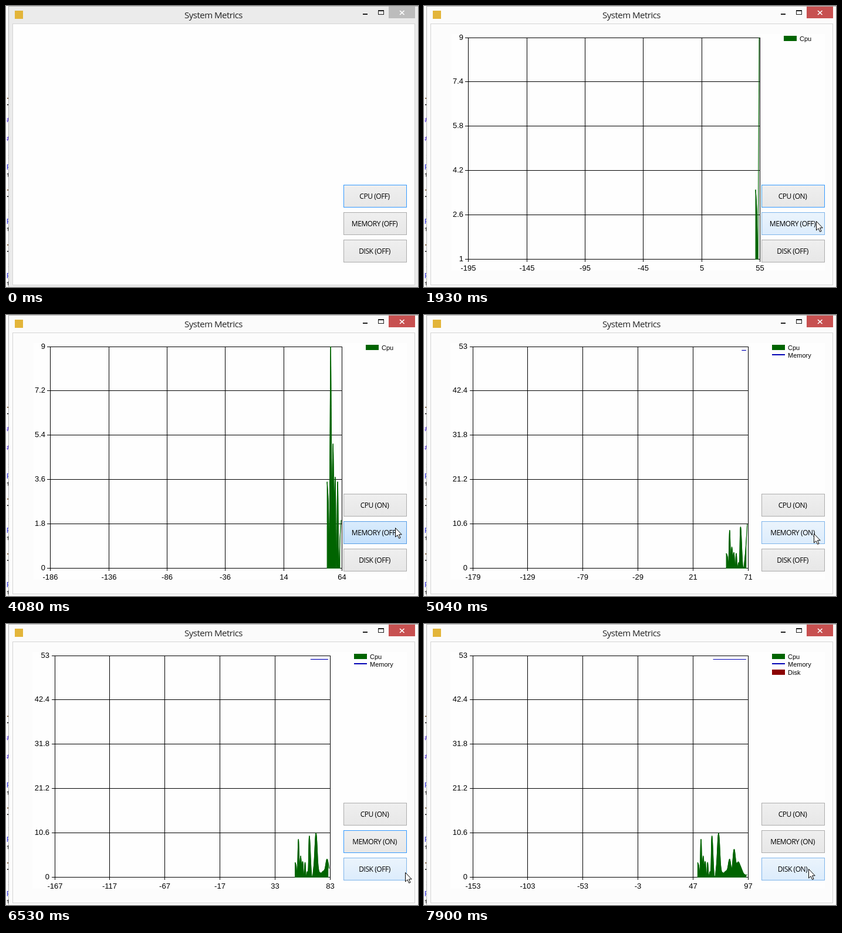
These frames come from a looping animation (702 by 481 pixels, 8000 ms). An HTML page:

```html
<!DOCTYPE html>
<html lang="en">
<head>
<meta charset="utf-8">
<title>System Metrics</title>
<style>
  html, body { margin: 0; width: 100%; height: 100%; overflow: hidden; background: #fff; }
  svg { display: block; }
  text { font-family: "Liberation Sans", Arial, sans-serif; white-space: pre; }
  .title { font: 15px "Open Sans", sans-serif; letter-spacing: -.5px; fill: #222; }
  .button { font: 12px "Open Sans", sans-serif; letter-spacing: -.45px; }
  .axis { font-size: 13px; }
  .legend { font-size: 11px; }
  .code { font: 11px "Noto Sans Mono", monospace; }
  .crisp { shape-rendering: crispEdges; }
</style>
</head>
<body>
<svg width="702" height="481" viewBox="0 0 702 481">
  <defs id="defs"></defs>
  <g id="scene"></g>
  <path id="pointer" d="M.5 .5V16L4 12.7L6.6 18.4L9 17.4L6.5 11.8H11.2Z" fill="#fff" stroke="#000"/>
</svg>
<script>
const LOOP = 8000, START = 960, PERIOD = 247, PRESS = 130;
const MEM_STEP = 13, DISK_STEP = 26;
const GREEN = '#006400', BLUE = '#0000b4', RED = '#8b0000';
const TOP = 54, BOTTOM = 433, SPAN = 250;

const BUTTONS = [
  { name: 'CPU', on: START },
  { name: 'MEMORY', on: START + MEM_STEP * PERIOD },
  { name: 'DISK', on: START + DISK_STEP * PERIOD }
].map((b, i) => ({ ...b, y: 306 + 47 * i }));
const [CPU, MEMORY, DISK] = BUTTONS;

// fill top, fill bottom, border
const LOOKS = {
  plain: ['#efefef', '#e7e7e7', '#acacac'],
  focus: ['#efefef', '#e7e7e7', '#3399ff'],
  hover: ['#ebf4fc', '#dcecfc', '#7eb4ea'],
  press: ['#daecfc', '#c4e0fc', '#569de5']
};

// Pointer stops: time, x, y
const STOPS = [
  [280, 690, 340], [550, 668, 332], [1250, 668, 332], [1930, 669, 369],
  [3290, 676, 371], [4080, 664, 365], [4740, 665, 375], [5700, 665, 375],
  [6530, 681, 426], [7200, 656, 420]
];

const LOAD = [
  3.5, 2.7, 1, 9, 2.6, 5.05, 2.6, 3.6, 0, 3.5, 0.1, 1.2, 1.95, 9.8,
  0.4, 2.6, 10.5, 2.5, 1, 1.3, 1.9, 4.3, 2, 6.6, 3.4, 3.6, 2.5, 0.7, 0.5
];
// All series share one counter, so each new one spreads the samples.
const sampleX = k => 51.5 + k + Math.max(0, k - MEM_STEP) + Math.max(0, k - DISK_STEP);

const rect = (x, y, w, h, fill, extra = '') =>
  `<rect x="${x}" y="${y}" width="${w}" height="${h}" fill="${fill}" ${extra}/>`;
const text = (x, y, s, cls, anchor = 'start', fill = '#000') =>
  `<text x="${x}" y="${y}" class="${cls}" text-anchor="${anchor}" fill="${fill}">${s}</text>`;
const path = (d, extra) => `<path d="${d}" ${extra}/>`;
const clip = (id, x, y, w, h) => `<clipPath id="${id}">${rect(x, y, w, h, '#000')}</clipPath>`;

function pointerAt(t) {
  const i = STOPS.findIndex(s => s[0] > t);
  if (i === 0) return null;
  if (i < 0) return STOPS[STOPS.length - 1].slice(1);
  const a = STOPS[i - 1], b = STOPS[i];
  const u = (t - a[0]) / (b[0] - a[0]), ease = u * u * (3 - 2 * u);
  return [1, 2].map(j => Math.round(a[j] + (b[j] - a[j]) * ease));
}

// Lines of source code peeping out beside the window.
function codeEdge() {
  let s = '';
  for (const y of [199, 231]) s += text(1, y, '#', 'code', 'start', '#2a00d0');
  for (let y = 261; y < 481; y += 93) {
    s += text(1, y, ':', 'code', 'start', '#999') +
      text(1, y + 16, 'p', 'code', 'start', '#1010d0') +
      text(1, y + 32, 't', 'code');
  }
  for (const y of [157, 314, 408]) s += rect(2, y, 2, 2, '#806040') + rect(2, y + 11, 2, 2, '#333');
  return `<g clip-path="url(#edge)">${s}</g>`;
}

function frame(active) {
  return rect(4, 0, 698, 481, active ? '#fbfbfb' : '#ebebeb') +
    path('M4.5 0V481M4 .5H702', 'stroke="#b4b4b4" class="crisp"') +
    rect(11.5, 30.5, 685, 447, active ? '#fcfcfc' : '#fefefe', 'stroke="#d4d4d4" class="crisp"') +
    rect(15, 8, 14, 14, '#e3b53a') +
    text(353.5, 21, 'System Metrics', 'title', 'middle') +
    rect(608, 13, 8, 2, '#222') +
    rect(634.5, 7.5, 9, 7, 'none', 'stroke="#222" class="crisp"') +
    rect(634, 7, 10, 2, '#222') +
    rect(652, 1, 45, 20, active ? '#c75050' : '#bcbcbc') +
    path('M671 8L678.5 15M678.5 8L671 15', 'stroke="#fff" stroke-width="1.7"');
}

function spline(points) {
  const k = 0.6 / 3, last = points.length - 1;
  let d = 'M' + points[0];
  for (let i = 0; i < last; i++) {
    const a = points[Math.max(0, i - 1)], b = points[i];
    const c = points[i + 1], e = points[Math.min(last, i + 2)];
    d += `C${b.map((v, j) => v + k * (c[j] - a[j]))} ${c.map((v, j) => v - k * (e[j] - b[j]))} ${c}`;
  }
  return d;
}

function legend(t, x) {
  let s = rect(x, 51, 22, 9, GREEN) + text(x + 27, 60, 'Cpu', 'legend');
  if (t >= MEMORY.on) s += rect(x, 67, 22, 2, BLUE) + text(x + 27, 73, 'Memory', 'legend');
  if (t >= DISK.on) s += rect(x, 78, 22, 9, RED) + text(x + 27, 87, 'Disk', 'legend');
  return s;
}

function chart(t) {
  if (t < CPU.on) return '';
  const mem = t >= MEMORY.on;
  const [left, right, labelX, boxX] = mem ? [82.5, 551.7, 74, 45] : [75.2, 572, 67, 47];
  const width = right - left, height = BOTTOM - TOP;
  const step = Math.floor((t - START) / PERIOD);
  const end = sampleX(step) + .5, start = end - SPAN;
  const values = LOAD.slice(0, step + 1);
  const low = Math.floor(Math.min(...values));
  const high = mem ? 53 : Math.ceil(Math.max(...values));
  const px = x => left + (x - start) / SPAN * width;
  const py = y => BOTTOM - (y - low) / (high - low) * height;

  let grid = '', labels = '';
  for (let i = 0; i <= 5; i++) {
    const x = Math.round(left + width * i / 5) + .5;
    const y = Math.floor(BOTTOM - height * i / 5) + .5;
    grid += `M${x} ${TOP}V${BOTTOM + 5}M${left - 5} ${y}H${right + 1}`;
    labels += text(x, 453, start + SPAN / 5 * i, 'axis', 'middle') +
      text(labelX, y + 3.5, +(low + (high - low) * i / 5).toFixed(1), 'axis', 'end');
  }

  const points = values.map((v, k) => [px(sampleX(k)), py(v)]);
  const curve = spline(points);
  // The fill stops just short of the newest sample.
  const filled = Math.max(0, px(end - 1.3) - left);
  const series = clip('plot', left, TOP, width, height + 1) +
    clip('area', left, TOP, filled, height + 1) +
    path(`${curve}V${BOTTOM + 1}H${points[0][0]}Z`,
      `fill="${GREEN}" stroke="${GREEN}" clip-path="url(#area)"`) +
    path(curve, `fill="none" stroke="${GREEN}" stroke-width="1.2" clip-path="url(#plot)"`);
  const since = sampleX(MEM_STEP) + 1;
  const memory = end - 1.5 > since
    ? path(`M${px(since)} 60.5H${px(end - 1.5)}`, `stroke="${BLUE}" stroke-width="1.2"`) : '';

  return rect(boxX, 48, 683 - boxX, 405, '#fefefe') +
    path(grid, 'stroke="#000" class="crisp"') + labels + series + memory +
    legend(t, mem ? 593 : 613);
}

function buttons(t, tip) {
  const focused = BUTTONS.filter(b => t >= b.on - PRESS).pop() || CPU;
  return BUTTONS.map(b => {
    const hover = tip && tip[0] >= 575 && tip[0] < 683 && tip[1] >= b.y && tip[1] < b.y + 39;
    const press = t >= b.on - PRESS && t < b.on;
    const look = press ? 'press' : hover ? 'hover' : b === focused ? 'focus' : 'plain';
    return rect(575.5, b.y + .5, 107, 38, `url(#${look})`, `stroke="${LOOKS[look][2]}" class="crisp"`) +
      text(628, b.y + 24, `${b.name} (${t >= b.on ? 'ON' : 'OFF'})`, 'button', 'middle');
  }).join('');
}

const [defs, scene, pointer] = ['defs', 'scene', 'pointer'].map(id => document.getElementById(id));
defs.innerHTML = clip('edge', 0, 0, 4, 481) + Object.entries(LOOKS).map(([id, [a, b]]) =>
  `<linearGradient id="${id}" x2="0" y2="1"><stop stop-color="${a}"/>` +
  `<stop offset="1" stop-color="${b}"/></linearGradient>`).join('');
const edge = codeEdge();
let shown = '';

function draw(t) {
  const tip = pointerAt(t);
  const markup = edge + frame(t >= CPU.on - PRESS) + chart(t) + buttons(t, tip);
  if (markup !== shown) scene.innerHTML = shown = markup;
  pointer.setAttribute('visibility', tip ? 'visible' : 'hidden');
  if (tip) pointer.setAttribute('transform', `translate(${tip[0] - 1} ${tip[1] - 1})`);
}

const began = performance.now();
function loop() {
  draw((performance.now() - began) % LOOP);
  requestAnimationFrame(loop);
}
loop();
</script>
</body>
</html>
```
